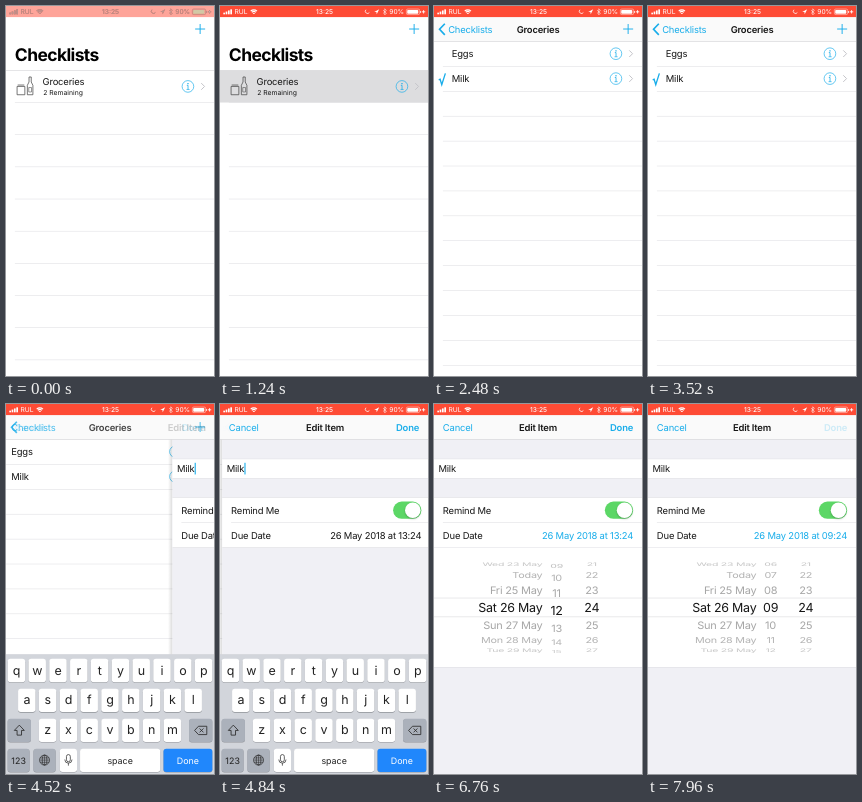
Animation, 208 px wide and 370 px high, one loop 8000 ms. Source, as an HTML page with a canvas:

```html
<!DOCTYPE html>
<html lang="en">
<head>
<meta charset="utf-8">
<title>Checklist app</title>
<style>
  html, body { margin: 0; width: 100%; height: 100%; overflow: hidden; background: #fff; }
  canvas { display: block; width: 208px; height: 370px; }
</style>
</head>
<body>
<canvas id="stage"></canvas>
<script>
// Everything is laid out in points on a 375 x 667 screen.
const LOOP = 8000, STEP = 40, W = 375, H = 667;
const BLUE = '#18adea', INK = '#161616', LINE = '#dfdfe3', GROUP = '#f0f0f5', PRESSED = '#dddddf';
const canvas = document.getElementById('stage');
const ctx = canvas.getContext('2d');
const dpr = window.devicePixelRatio || 1;
canvas.width = 208 * dpr;
canvas.height = 370 * dpr;
const scale = canvas.width / W;

const clamp = v => Math.max(0, Math.min(1, v));
const mix = (a, b, p) => a + (b - a) * p;

// Critically damped progress whose first visible step falls at `first`.
function spring(t, first, lead = 46) {
  if (t < first) return 0;
  if (t > first + 480) return 1;
  const x = 0.0179 * (t - first + lead);
  return 1 - (1 + x) * Math.exp(-x);
}

function group(alpha, dx, dy, draw) {
  if (alpha <= 0) return;
  ctx.save();
  ctx.globalAlpha *= alpha;
  ctx.translate(dx, dy);
  draw();
  ctx.restore();
}

function box(x, y, w, h, color) {
  ctx.fillStyle = color;
  ctx.fillRect(x, y, w, h);
}

function round(x, y, w, h, r, color) {
  ctx.fillStyle = color;
  ctx.beginPath();
  ctx.roundRect(x, y, w, h, r);
  ctx.fill();
}

function stroke(points, color, width, close) {
  ctx.beginPath();
  points.forEach(([x, y]) => ctx.lineTo(x, y));
  if (close) ctx.closePath();
  ctx.strokeStyle = color;
  ctx.lineWidth = width;
  ctx.stroke();
}

function arc(x, y, r, from, to, color, width) {
  ctx.beginPath();
  ctx.arc(x, y, r, from, to);
  ctx.strokeStyle = color;
  ctx.lineWidth = width;
  ctx.stroke();
}

const ring = (x, y, r, color, width) => arc(x, y, r, 0, 7, color, width);

// `y` is the middle of the capital letters.
function text(s, x, y, { size = 17, weight = 400, color = INK, align = 'left' } = {}) {
  const tracking = size > 28 ? -0.035 : size > 16 ? -0.02 : 0;
  ctx.font = `${weight} ${size}px Inter, "Open Sans", sans-serif`;
  ctx.letterSpacing = `${tracking * size}px`;
  ctx.textRendering = 'geometricPrecision';
  ctx.textAlign = align;
  ctx.fillStyle = color;
  ctx.fillText(s, x, y + size * 0.364);
}

function statusBar(back, ink, charge) {
  box(0, 0, W, 20, back);
  for (let i = 0; i < 4; i++) box(6 + i * 4.2, 12 - i * 2, 3, 3 + i * 2, ink);
  text('RUL', 26, 10.3, { size: 12, color: ink });
  for (const r of [2, 5, 8]) arc(61, 15, r, -2.36, -0.78, ink, 2);
  text('13:25', W / 2 + 1, 10.3, { size: 12, weight: 500, color: ink, align: 'center' });
  arc(266, 9.5, 4, 0.6, 3.9, ink, 1.4);
  ctx.fillStyle = ink;
  ctx.beginPath();
  [[278, 11], [287, 6], [282.5, 15], [282, 11]].forEach(p => ctx.lineTo(...p));
  ctx.fill();
  stroke([[294, 7.5], [300, 13], [297, 16], [297, 5], [300, 8], [294, 13.5]], ink, 1);
  text('90%', 332, 10.3, { size: 12, color: ink, align: 'right' });
  ctx.strokeStyle = ink;
  ctx.lineWidth = 0.8;
  ctx.beginPath();
  ctx.roundRect(336, 5.5, 24, 10, 2.5);
  ctx.stroke();
  round(337.5, 7, 20, 7, 1.5, charge);
  box(361, 9, 1.5, 3.5, ink);
  stroke([[364, 10.5], [370, 10.5]], ink, 1.6);
  stroke([[367, 7.5], [367, 13.5]], ink, 1.6);
}

function accessory(y) {
  ring(328, y, 10.5, BLUE, 1.2);
  box(327, y - 6.2, 2.2, 2.2, BLUE);
  stroke([[326, y - 2], [328.2, y - 2], [328.2, y + 5.5]], BLUE, 1.4);
  stroke([[325.5, y + 5.5], [331, y + 5.5]], BLUE, 1.2);
  stroke([[352, y - 6], [358, y], [352, y + 6]], '#c4c4c9', 1.8);
}

function rules(top, pitch) {
  for (let y = top + pitch; y < H; y += pitch) box(16, y - 0.5, W, 1, LINE);
}

function checklistsPage(pressed) {
  box(0, 0, W, H, '#fff');
  if (pressed) box(0, 116, W, 58, PRESSED);
  rules(116, 58);
  const ink = '#444';
  stroke([[20, 145], [34, 145], [34, 160], [20, 160]], ink, 1.3, true);
  stroke([[21, 142.5], [33, 142.5]], ink, 1.3);
  stroke([[41.5, 128], [45.5, 128], [45.5, 137], [48.5, 143], [48.5, 160],
          [38.5, 160], [38.5, 143], [41.5, 137]], ink, 1.3, true);
  stroke([[41, 147], [46, 147], [46, 155], [41, 155]], ink, 1, true);
  text('Groceries', 66, 135.5);
  text('2 Remaining', 67, 156.5, { size: 12.3 });
  accessory(145);
}

function groceriesPage(t) {
  const pitch = 44.9;
  box(0, 0, W, H, '#fff');
  if (t >= 2120) {
    group(1 - (t - 2120) / 360, 0, 0, () => box(0, 64 + pitch, W, pitch, PRESSED));
    stroke([[8.5, 133], [11, 132], [14, 142], [20.5, 121.5]], BLUE, 2.4);
  }
  rules(64, pitch);
  ['Eggs', 'Milk'].forEach((name, i) => {
    const y = 86 + i * pitch;
    text(name, 32, y);
    accessory(y);
  });
}

// One picker column: a drum of rows, magnified and dark inside the centre band.
function wheel(x, align, label, pos) {
  const turn = 0.372, radius = 86, band = 17;
  for (const inside of [false, true]) {
    ctx.save();
    ctx.beginPath();
    if (inside) ctx.rect(0, -band, W, band * 2);
    else {
      ctx.rect(0, -108, W, 108 - band);
      ctx.rect(0, band, W, 108 - band);
    }
    ctx.clip();
    for (let i = -4; i <= 4; i++) {
      const row = Math.round(pos) + i, angle = (row - pos) * turn;
      if (Math.abs(angle) > 1.3) continue;
      const c = Math.cos(angle);
      group(inside ? 1 : 0.12 + 0.28 * c, x, radius * Math.sin(angle), () => {
        ctx.scale(0.9 + 0.1 * c, c);
        text(label(row), 0, 0, { size: inside ? 22.5 : 20, align });
      });
    }
    ctx.restore();
  }
}

function dayLabel(d) {
  if (d === 24) return 'Today';
  const names = ['Sun', 'Mon', 'Tue', 'Wed', 'Thu', 'Fri', 'Sat'];
  return `${names[(d + 1) % 7]} ${d} May`;
}
const padded = n => String(n).padStart(2, '0');

function picker(t) {
  if (t < 5520) return;
  const p = clamp((t - 5480) / 300);
  const top = 258.8, open = 216 * (1 - (1 - p) ** 2.5);
  ctx.save();
  ctx.beginPath();
  ctx.rect(0, top, W, open);
  ctx.clip();
  box(0, top, W, open, '#fff');
  const s = clamp((t - 6570) / 820);
  const hour = 13 - 4 * (1 - (1 - s ** 1.3) ** 2.2);
  group(p, 0, top + open - 108, () => {
    for (const y of [-17, 17]) box(0, y - 0.5, W, 1, '#d6d6da');
    wheel(195.5, 'right', dayLabel, 26);
    wheel(221, 'center', padded, hour);
    wheel(284.5, 'center', padded, 24);
  });
  ctx.restore();
  box(0, top + open - 0.5, W, 1, LINE);
}

function editPage(t) {
  box(0, 0, W, H, GROUP);
  for (const [y, h] of [[99, 35], [169, 89.8]]) {
    box(0, y, W, h, '#fff');
    box(0, y - 0.5, W, 1, LINE);
    box(0, y + h - 0.5, W, 1, LINE);
  }
  text('Milk', 8, 116.5);
  if (t < 5520) box(40, 106, 2, 21, BLUE);
  box(16, 213.4, W, 1, LINE);
  text('Remind Me', 16, 191.4);
  round(308, 176, 51, 31, 15.5, '#5cd766');
  ctx.save();
  ctx.shadowColor = 'rgba(0,0,0,.25)';
  ctx.shadowBlur = 2 * dpr;
  ctx.shadowOffsetY = dpr;
  round(329.5, 177.5, 28, 28, 14, '#fff');
  ctx.restore();
  text('Due Date', 16, 236.5);
  text(`26 May 2018 at ${t < 7360 ? '13' : '09'}:24`, 359, 236.5,
    { color: t < 5520 ? INK : BLUE, align: 'right' });
  picker(t);
}

function key(x, y, w, label, { fill = '#fff', color = '#222', size = 16 } = {}) {
  round(x, y + 1, w, 42, 5, '#8f9298');
  round(x, y, w, 42, 5, fill);
  const drop = size > 20 ? -1 : 0;
  text(label, x + w / 2, y + 21 + drop, { size, color, align: 'center' });
}

function keyboard() {
  const grey = { fill: '#abb1bb' }, ink = '#2a2a2a';
  box(0, 451, W, 216, '#d2d5db');
  [['qwertyuiop', 3], ['asdfghjkl', 21.75], ['zxcvbnm', 59.25]].forEach(([letters, x], row) => {
    [...letters].forEach((c, i) => key(x + i * 37.5, 459.5 + row * 54, 31.5, c, { size: 22.5 }));
  });
  key(3, 567.5, 42, '', grey);
  stroke([[24, 579], [33, 588.5], [28, 588.5], [28, 597], [20, 597], [20, 588.5], [15, 588.5]], ink, 1.5, true);
  key(330, 567.5, 42, '', grey);
  stroke([[340, 588.5], [347, 581], [362, 581], [362, 596], [347, 596]], ink, 1.5, true);
  stroke([[349, 585], [356, 592]], ink, 1.5);
  stroke([[356, 585], [349, 592]], ink, 1.5);
  key(3, 621.5, 39.5, '123', grey);
  key(49.5, 621.5, 40, '', grey);
  ring(69.5, 642, 9, ink, 1.3);
  ctx.beginPath();
  ctx.ellipse(69.5, 642, 4.2, 9, 0, 0, 7);
  ctx.stroke();
  for (const dy of [-4, 0, 4]) stroke([[61.5, 642 + dy], [77.5, 642 + dy]], ink, 1);
  stroke([[69.5, 633], [69.5, 651]], ink, 1);
  key(97, 621.5, 31, '');
  ctx.lineWidth = 1.3;
  ctx.beginPath();
  ctx.roundRect(109, 632, 7, 13, 3.5);
  ctx.stroke();
  arc(112.5, 641, 6.5, 0, Math.PI, ink, 1.3);
  stroke([[112.5, 647.5], [112.5, 652]], ink, 1.3);
  key(133.5, 621.5, 144.5, 'space');
  key(284, 621.5, 88, 'Done', { fill: '#2087fc', color: '#fff' });
}

function slideIn(p, under, over) {
  if (p < 1) group(1, -0.3 * W * p, 0, under);
  if (p <= 0) return;
  const x = W * (1 - p);
  if (p < 1) {
    const shade = ctx.createLinearGradient(x - 8, 0, x, 0);
    shade.addColorStop(0, 'rgba(0,0,0,0)');
    shade.addColorStop(1, 'rgba(0,0,0,.14)');
    box(x - 8, 0, 8, H, shade);
  }
  group(1, x, 0, over);
}

function navBar(t, list, edit) {
  const height = mix(116, 64, list), title = { weight: 600, align: 'center' };
  box(0, 0, W, height, list > 0 ? '#fafafa' : '#fff');
  box(0, height - 0.5, W, 1, '#d0d0d4');

  group(1 - list, mix(16, 26, list), mix(88.5, 42, list), () =>
    text('Checklists', 0, 0, { size: mix(31.5, 17, list), weight: 700, color: '#000' }));
  group(list * (1 - edit), 0, 0, () => {
    stroke([[19.5, 32], [10, 42], [19.5, 52]], BLUE, 3);
    text('Checklists', mix(60, 25.5, list) - 80 * edit, 42, { color: BLUE });
    text('Groceries', W / 2 + 173 * (1 - list), 42, title);
  });
  group(1 - edit, 0, 0, () => {
    stroke([[341, 41.5], [359, 41.5]], BLUE, 1.7);
    stroke([[350, 32.5], [350, 50.5]], BLUE, 1.7);
  });
  group(edit, 0, 0, () => {
    text('Cancel', 16, 42, { color: BLUE });
    text('Edit Item', W / 2 + 173 * (1 - edit), 42, title);
    group(t >= 7960 ? 0.2 : 1, 0, 0, () =>
      text('Done', 359, 42, { weight: 600, color: BLUE, align: 'right' }));
  });
}

function render(t) {
  ctx.setTransform(scale, 0, 0, scale, 0, 0);
  box(0, 0, W, H + 1, '#fff');
  const list = spring(t, 1400), edit = spring(t, 4520);
  if (t < 4520) slideIn(list, () => checklistsPage(t >= 1240), () => groceriesPage(t));
  else slideIn(edit, () => groceriesPage(t), () => editPage(t));
  navBar(t, list, edit);
  const red = clamp(0.5 + t / 320);
  if (red < 1) statusBar('#fff', '#000', '#4cd964');
  group(red, 0, 0, () => statusBar('#fe4b35', '#fff', '#fff'));
  const hidden = spring(t, 5520, 24);
  if (t >= 4520 && hidden < 1) group(1, 0, 216 * hidden, keyboard);
}

const start = performance.now();
function tick() {
  const t = (performance.now() - start) % LOOP;
  render(Math.floor(t / STEP) * STEP);
  requestAnimationFrame(tick);
}
tick();
</script>
</body>
</html>
```
